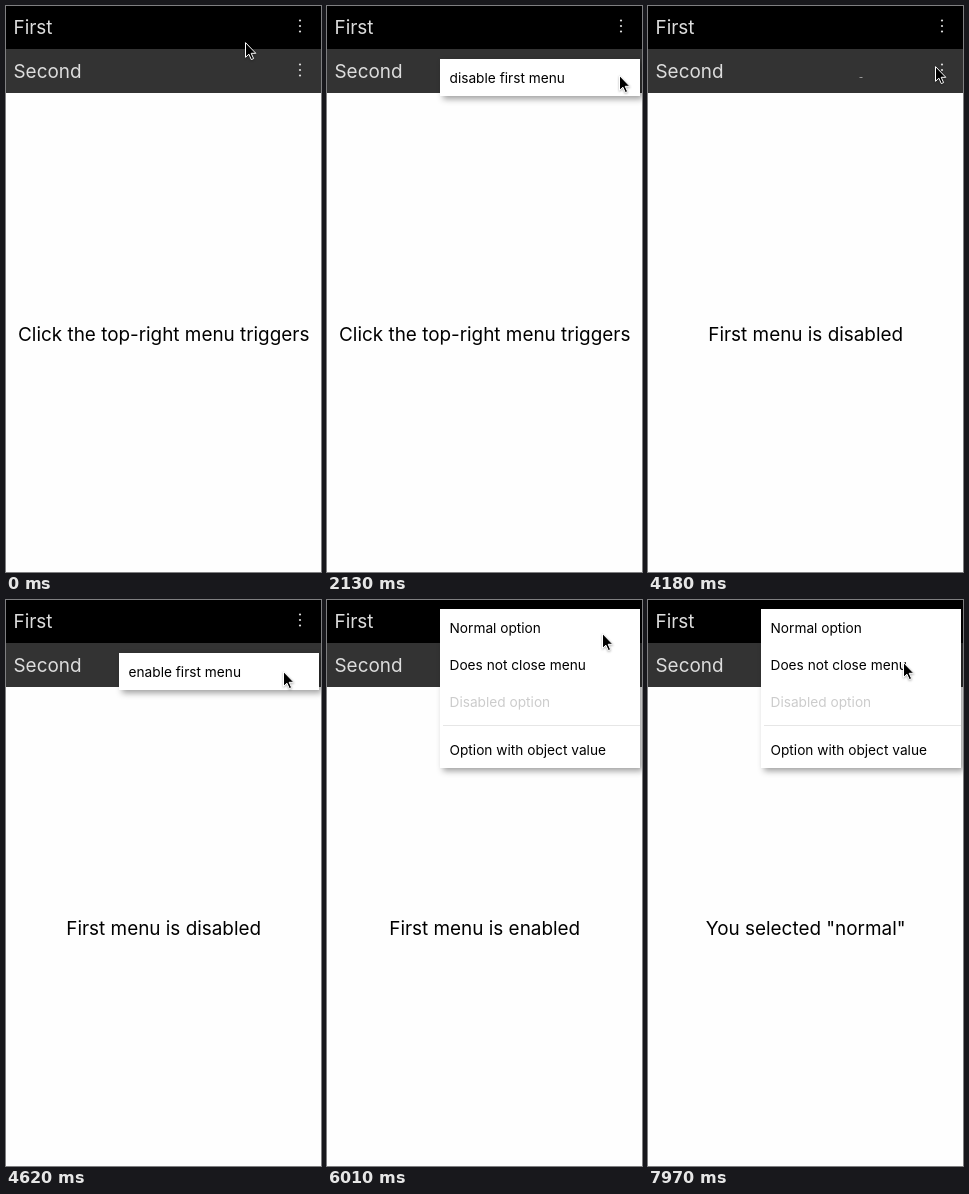
An HTML page for the animation above (8 s loop, 315 by 566 pixels).

```html
<!DOCTYPE html>
<html lang="en">
<head>
<meta charset="utf-8">
<title>Popup menu demo</title>
<style>
  html, body { margin: 0; width: 100%; height: 100%; overflow: hidden; background: #fefefe; }
  svg { display: block; width: 315px; height: 566px; }
  text { font: 18.9px Inter, Roboto, sans-serif; }
  .bar { fill: #ddd; }
  .menu { transform-box: view-box; }
  .menu text { font-size: 13.7px; }
  .panel { fill: #fff; filter: drop-shadow(3px 3px 3.4px rgba(0, 0, 0, .38)); }
  .off { fill: #ccc; }
  #cursor { filter: drop-shadow(0 1px 1px rgba(0, 0, 0, .3)); }
</style>
</head>
<body>
<svg viewBox="0 0 315 566">
  <rect width="315" height="43" fill="#000"/>
  <rect y="43" width="315" height="44" fill="#333"/>
  <text class="bar" x="7.5" y="28.4">First</text>
  <text class="bar" x="7.5" y="72.4">Second</text>
  <g id="dots" fill="#ddd"></g>
  <text id="message" x="157.7" y="334.5" text-anchor="middle"></text>

  <g class="menu" id="options" style="transform-origin: 213px 88.5px">
    <rect class="panel" x="113" y="9" width="200" height="159"/>
    <text x="122.5" y="32.5">Normal option</text>
    <text x="122.5" y="69.5">Does not close menu</text>
    <text x="122.5" y="106.5" class="off">Disabled option</text>
    <rect x="116" y="125" width="197" height="1" fill="#e6e6e6"/>
    <text x="122.5" y="154.5">Option with object value</text>
  </g>

  <g class="menu" id="toggle" style="transform-origin: 213px 71.5px">
    <rect class="panel" x="113" y="53" width="200" height="37"/>
    <text id="label" x="122.5" y="76.5"></text>
  </g>

  <path id="cursor" d="M.5 .6V15.3l3.4-3.1 2.4 5.4 2.3-1-2.4-5.3h4.6z"
        fill="#000" stroke="#fff"/>
</svg>
<script>
const LOOP = 8000;
const TICK = 88.7; // the picture advances in whole ticks
const $ = id => document.getElementById(id);

// Times are in ticks. Closing a menu shows its message.
const menus = [
  { id: 'toggle', open: 16, close: 27, label: 'disable first menu', message: 'First menu is disabled' },
  { id: 'toggle', open: 47, close: 54, label: 'enable first menu', message: 'First menu is enabled' },
  { id: 'options', open: 63.2, close: 71, message: 'You selected "normal"' },
  { id: 'options', open: 82, close: Infinity }
];

// Points the cursor visits, each with the tick at which it sets off.
const stops = [
  { at: 1, to: [271, 72] },
  { at: 4, to: [279, 83] },
  { at: 7, to: [288, 85] },
  { at: 10, to: [295, 63] },
  { at: 23, to: [292, 69] },
  { at: 30, to: [299, 17] },
  { at: 41, to: [287, 60] },
  { at: 50, to: [277, 71] },
  { at: 57, to: [299, 26] },
  { at: 61, to: [299, 20] },
  { at: 67, to: [275, 33] },
  { at: 76, to: [290, 14] },
  { at: 85, to: [258, 59] },
  { at: 89, to: [255, 62] }
];

const easeOut = p => 1 - (1 - Math.min(1, p)) ** 3;

// Long moves take three ticks, short ones two.
function cursorAt(tick) {
  let [x, y] = [239, 36];
  for (const { at, to } of stops) {
    if (tick < at) break;
    const dx = to[0] - x, dy = to[1] - y;
    const ticks = Math.hypot(dx, dy) > 49 ? 3 : 2;
    const p = Math.sin(Math.min(1, (tick - at + 1) / ticks) * Math.PI / 2);
    x += dx * p;
    y += dy * p;
  }
  return [x, y].map(Math.round);
}

function render(time) {
  const tick = Math.floor(time % LOOP / TICK + .25);
  let message = 'Click the top-right menu triggers';
  for (const id of ['toggle', 'options']) $(id).style.display = 'none';

  for (const menu of menus) {
    if (tick >= menu.close) {
      message = menu.message;
    } else if (tick >= menu.open) {
      const { style } = $(menu.id);
      style.display = '';
      style.transform = `scale(${easeOut((tick - menu.open + .01) / 2)})`;
      if (menu.label) $('label').textContent = menu.label;
    }
  }
  $('message').textContent = message;
  $('cursor').setAttribute('transform', `translate(${cursorAt(tick)})`);
}

for (const y of [20, 64])
  for (const dy of [-5.5, 0, 5.5])
    $('dots').innerHTML += `<circle cx="294" cy="${y + dy}" r="1.1"/>`;

let origin;
function play(now) {
  origin ??= now;
  render(Math.max(0, now - origin));
  requestAnimationFrame(play);
}
render(0);
requestAnimationFrame(play);
</script>
</body>
</html>
```
